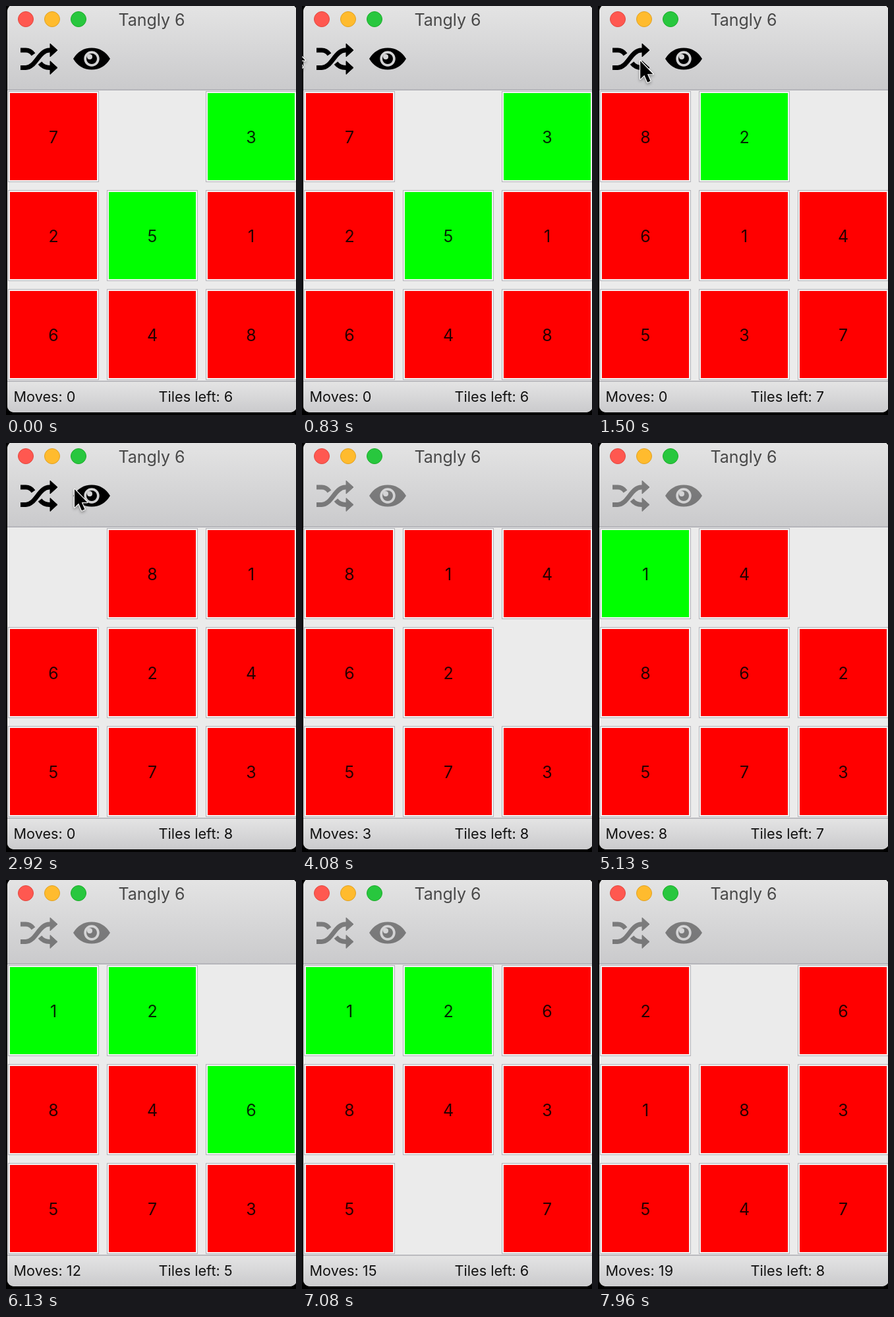
Animation, 440 px wide and 620 px high, one loop 8 s. Source, as an HTML page:

```html
<!DOCTYPE html>
<html lang="en">
<head>
<meta charset="utf-8">
<title>Tangly 6</title>
<style>
html, body { margin: 0; width: 100%; height: 100%; overflow: hidden; background: #000; }
svg { display: block; width: 440px; height: 620px; }
text { font-family: Inter, "Open Sans", sans-serif; }
#cursor { filter: drop-shadow(0 2px 2px rgba(0, 0, 0, .35)); }
</style>
</head>
<body>
<svg viewBox="0 0 440 620">
  <defs>
    <linearGradient id="bar" x1="0" y1="0" x2="0" y2="1">
      <stop offset="0" stop-color="#e4e4e4"/>
      <stop offset="1" stop-color="#cacacc"/>
    </linearGradient>
    <clipPath id="win"><rect x="2" y="-2" width="439" height="618" rx="10"/></clipPath>
    <mask id="iris" maskUnits="userSpaceOnUse" x="100" y="58" width="60" height="44">
      <rect x="100" y="58" width="60" height="44" fill="#fff"/>
      <circle cx="130" cy="80" r="11.7"/>
      <circle cx="130" cy="80" r="8" fill="#fff"/>
      <circle cx="127" cy="77" r="4"/>
    </mask>
  </defs>

  <g clip-path="url(#win)">
    <rect width="441" height="620" fill="#ebebeb"/>
    <rect y="-2" width="441" height="129" fill="url(#bar)"/>
    <rect y="126.5" width="441" height="1.5" fill="#adadb3"/>
    <g id="tiles"></g>
    <rect y="569" width="441" height="48" fill="url(#bar)"/>
    <rect y="568" width="441" height="1.5" fill="#adadb3"/>

    <g stroke-width="1">
      <circle cx="30" cy="20" r="11.5" fill="#ff5850" stroke="#e0483f"/>
      <circle cx="70" cy="20" r="11.5" fill="#ffbb2e" stroke="#dfa023"/>
      <circle cx="110" cy="20" r="11.5" fill="#28c73e" stroke="#1dac2b"/>
    </g>
    <text x="221" y="29.5" font-size="25" text-anchor="middle" fill="#484848">Tangly 6</text>

    <g id="tools">
      <g fill="none" stroke="#000" stroke-width="7">
        <path d="M22 93.5H30C45 93.5 50 67 66 67H69"/>
        <path d="M22 67H30Q37 67 41.500 73.500M51.500 86.500Q57 93.500 66 93.500H69"/>
      </g>
      <path d="M67 57L78 67L67 77ZM67 83.500L78 93.500L67 103.500Z" stroke="#000" stroke-linejoin="round"/>
      <path d="M102 80Q112 63.500 130 63.500T158 80Q148 96.500 130 96.500T102 80Z" mask="url(#iris)"/>
    </g>

    <g font-size="21.7" fill="#111">
      <text id="moves" x="11.500" y="600"></text>
      <text id="left" x="231.500" y="600"></text>
    </g>
  </g>
  <path id="cursor" d="M0 0V27.500L6.200 21.600L11 32.500L15.400 30.500L10.800 20H19.300Z"
        stroke="#fff" stroke-width="2.400" paint-order="stroke" stroke-linejoin="round"/>
</svg>

<script>
const LOOP = 8000, SOLVE = 3105, STEP = 250;
const $ = id => document.getElementById(id);

// Boards set by the shuffle button; 0 is the empty cell.
const boards = [[0, '703251648'], [1300, '820614537'], [2080, '081624573']];
// Tiles that slide into the gap, in order.
const slides = '8142681426426374812';
// Pointer path: time, x, y.
const path = [
  [740, -24, 60], [1180, 64, 83], [2480, 65, 84], [2920, 104, 70],
  [3060, 113, 76], [3220, 113, 76], [3620, -24, 110]
];

function add(parent, tag, attrs) {
  const el = document.createElementNS('http://www.w3.org/2000/svg', tag);
  for (const key in attrs) el.setAttribute(key, attrs[key]);
  return parent.appendChild(el);
}

const cells = Array.from({ length: 9 }, (_, i) => {
  const g = add($('tiles'), 'g', {
    transform: `translate(${i % 3 * 150} ${Math.floor(i / 3) * 150})`
  });
  add(g, 'rect', { x: 3.5, y: 129.5, width: 137, height: 137, fill: '#f3f3f3', stroke: '#b4b4ba' });
  const face = add(g, 'rect', { x: 6, y: 132, width: 132, height: 132 });
  const label = add(g, 'text', {
    x: 72, y: 208, 'font-size': 25, 'text-anchor': 'middle', fill: '#000', 'fill-opacity': .85
  });
  return { g, face, label };
});

function boardAt(t, moves) {
  const board = [...boards.filter(b => b[0] <= t).pop()[1]];
  for (const tile of slides.slice(0, moves)) {
    const from = board.indexOf(tile);
    board[board.indexOf('0')] = tile;
    board[from] = '0';
  }
  return board;
}

function placeCursor(t) {
  const i = path.findIndex(p => p[0] > t);
  const shown = i > 0;
  $('cursor').style.display = shown ? '' : 'none';
  if (!shown) return;
  const [t0, x0, y0] = path[i - 1], [t1, x1, y1] = path[i];
  const u = (t - t0) / (t1 - t0), k = u * u * (3 - 2 * u);
  $('cursor').setAttribute('transform', `translate(${x0 + (x1 - x0) * k} ${y0 + (y1 - y0) * k})`);
}

function draw(t) {
  const moves = Math.max(0, Math.min(slides.length, Math.floor((t - SOLVE) / STEP)));
  let left = 0;
  boardAt(t, moves).forEach((tile, i) => {
    const { g, face, label } = cells[i];
    const home = +tile === i + 1;
    g.style.display = tile === '0' ? 'none' : '';
    face.setAttribute('fill', home ? '#00ff00' : '#ff0000');
    label.textContent = tile;
    if (tile !== '0' && !home) left++;
  });
  $('moves').textContent = `Moves: ${moves}`;
  $('left').textContent = `Tiles left: ${left}`;
  $('tools').setAttribute('opacity', t < SOLVE ? 1 : .42);
  placeCursor(t);
}

const start = performance.now();
function tick() {
  draw((performance.now() - start) % LOOP);
  requestAnimationFrame(tick);
}
tick();
</script>
</body>
</html>
```
